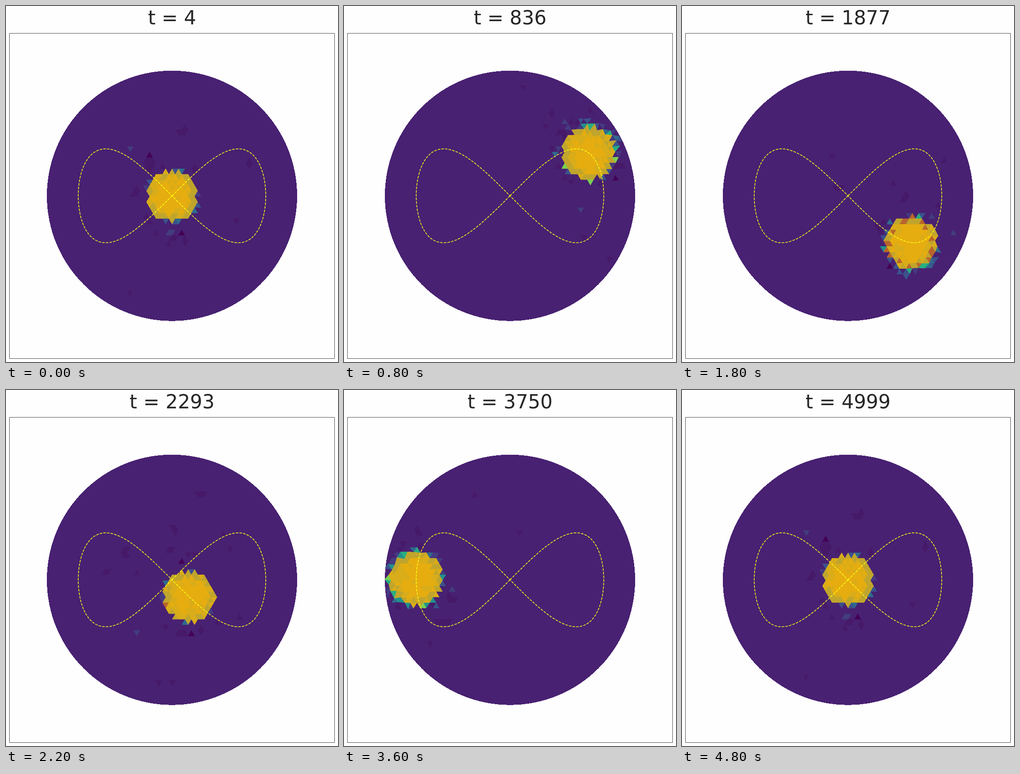
Animation, 723 px wide and 775 px high, one loop 5000 ms. Source, as an HTML page:

```html
<!DOCTYPE html>
<html lang="en">
<head>
<meta charset="utf-8">
<title>Tracking on a disk</title>
<style>
html, body { margin: 0; width: 100%; height: 100%; overflow: hidden; background: #fefefe; }
svg { display: block; width: 100%; height: 100%; }
text { font-family: "DejaVu Sans", sans-serif; font-size: 42px; fill: #262626; text-anchor: middle; }
</style>
</head>
<body>
<svg viewBox="0 0 723 775">
  <defs><clipPath id="disk"><circle cx="361.5" cy="413.2" r="272.5"/></clipPath></defs>
  <rect width="723" height="775" fill="#fefefe"/>
  <text id="title" x="361.7" y="40"></text>
  <circle cx="361.5" cy="413.2" r="272.5" fill="#482172" shape-rendering="crispEdges"/>
  <g id="cells" clip-path="url(#disk)" shape-rendering="crispEdges" stroke-width=".3"></g>
  <path id="track" fill="none" stroke="#ffff14" stroke-width="1.5" stroke-dasharray="5.55 2.4"/>
  <rect x="7.5" y="59.5" width="708" height="708" fill="none" stroke="#515151"/>
</svg>
<script>
const STEPS = 25, STEP_MS = 200;
const CX = 361.7, CY = 414.5, SIDE = 14, ROW = 12.1;
const GOLD = '#e6ad10', AMBER = '#d9ac19', OLIVE = '#c0a52c', RUST = '#b8652c';
const FRINGE = ['#443b80', '#3b528b', '#2f6a8e', '#21918c', '#28ae80', '#7ad151'];
const DIM = '#471969', DEEP = '#440154', BLUE = '#433d7d';

// Phase of the blob along the track: step, degrees
const phases = [[0, 0], [4, 57], [7, 105.5], [11, 169.5], [15, 216], [20, 305], [24, 360]];

const byId = id => document.getElementById(id);

// Seeded random number in 0..1
function rand(a, b) {
  let h = Math.imul(a + 101, 0x9e3779b1) ^ Math.imul(b + 211, 0x85ebca6b);
  h = Math.imul(h ^ h >>> 15, 0x2c1b3c6d);
  h = Math.imul(h ^ h >>> 12, 0x297a2d39);
  return ((h ^ h >>> 15) >>> 0) / 2 ** 32;
}

function orbit(degrees) {
  const a = degrees * Math.PI / 180;
  return [361.5 + 204.2 * Math.sin(a), 413.2 - 102.2 * Math.sin(2 * a)];
}

// Regular lattice, loosened towards the rim
function vertex(row, col) {
  const x = CX + SIDE * (col + (row % 2 ? 0 : .5)), y = CY + ROW * row;
  const loose = Math.max(0, Math.min(1, (Math.hypot(x - CX, y - CY) - 175) / 80)) * 6;
  return [x + loose * (rand(row, col) - .5), y + loose * (rand(col, row + 60) - .5)];
}

function makeCell(...pts) {
  return {
    x: (pts[0][0] + pts[1][0] + pts[2][0]) / 3,
    y: (pts[0][1] + pts[1][1] + pts[2][1]) / 3,
    d: 'M' + pts.map(p => p[0].toFixed(1) + ' ' + p[1].toFixed(1)).join('L') + 'Z'
  };
}

function makeMesh() {
  const mesh = [];
  for (let r = -23; r < 23; r++) {
    for (let c = -21; c < 21; c++) {
      const a = vertex(r, c), b = vertex(r, c + 1);
      const e = vertex(r + 1, c), f = vertex(r + 1, c + 1);
      if (r % 2) mesh.push(makeCell(a, b, e), makeCell(b, e, f));
      else mesh.push(makeCell(a, b, f), makeCell(a, e, f));
    }
  }
  return mesh.filter(t => Math.hypot(t.x - CX, t.y - CY) < 278);
}
const mesh = makeMesh();

function poseAt(step) {
  const i = Math.max(1, phases.findIndex(p => p[0] >= step));
  const [s0, d0] = phases[i - 1], [s1, d1] = phases[i];
  const [x, y] = orbit(d0 + (d1 - d0) * (step - s0) / (s1 - s0));
  const blur = Math.min(1, (Math.hypot(x - CX, y - CY) / 200) ** 2);
  return {
    x, y, blur,
    radius: 55.2 + 1.8 * blur,
    outward: Math.atan2(y - CY, x - CX),
    rust: blur * Math.max(0, y - CY) / 250
  };
}

// Gold core, olive edge, then a ragged fringe that grows near the rim
function blobColor(cell, i, seed, pose) {
  const dx = cell.x - pose.x, dy = cell.y - pose.y;
  const depth = pose.radius - Math.hypot(dx, dy);
  if (depth < -17) return null;
  const h = rand(i, seed);
  if (depth > 26) return h < .08 ? AMBER : GOLD;
  if (depth > 13) return h < .5 ? AMBER : GOLD;
  if (depth > 0) return h < pose.rust ? RUST : h < .7 ? OLIVE : AMBER;

  const facing = Math.cos(Math.atan2(dy, dx) - pose.outward);
  const near = depth > -6;
  const chance = near ? .4 + pose.blur * (.3 + .15 * facing) : pose.blur * (.22 + .15 * facing);
  if (h > chance) return null;
  return FRINGE[Math.floor(h / chance * (near ? 3 + 3 * pose.blur : 3))];
}

// Weak stray cells, mostly gathered around the blob
function addStrays(colors, seed, pose) {
  for (let n = 0; n < 24; n++) {
    const angle = rand(n, seed + 50) * 2 * Math.PI;
    const far = 70 + 190 * rand(n, seed + 100) ** 2;
    const x = pose.x + far * Math.cos(angle), y = pose.y + far * Math.sin(angle);
    const color = n < 2 ? DEEP : n < 4 ? BLUE : DIM;
    const reach = n < 20 ? 5 : 9;
    mesh.forEach((cell, i) => {
      if (Math.hypot(cell.x - x, cell.y - y) < reach) colors[i] = colors[i] || color;
    });
  }
}

function renderStep(step) {
  const pose = poseAt(step), seed = step % (STEPS - 1);
  const colors = mesh.map((cell, i) => blobColor(cell, i, seed, pose));
  addStrays(colors, seed, pose);
  const paths = {};
  colors.forEach((c, i) => { if (c) paths[c] = (paths[c] || '') + mesh[i].d; });
  byId('cells').innerHTML = Object.entries(paths)
    .map(([c, d]) => `<path fill="${c}" stroke="${c}" d="${d}"/>`).join('');
  byId('title').textContent = 't = ' + Math.floor(4 + step * 4995 / (STEPS - 1));
}

const trackPoints = Array.from({ length: 361 }, (_, i) =>
  orbit(i).map(v => v.toFixed(2)).join(' '));
byId('track').setAttribute('d', 'M' + trackPoints.join('L'));

let shown = -1;
function tick() {
  const step = Math.floor(performance.now() / STEP_MS) % STEPS;
  if (step !== shown) renderStep(shown = step);
  requestAnimationFrame(tick);
}
tick();
</script>
</body>
</html>
```
